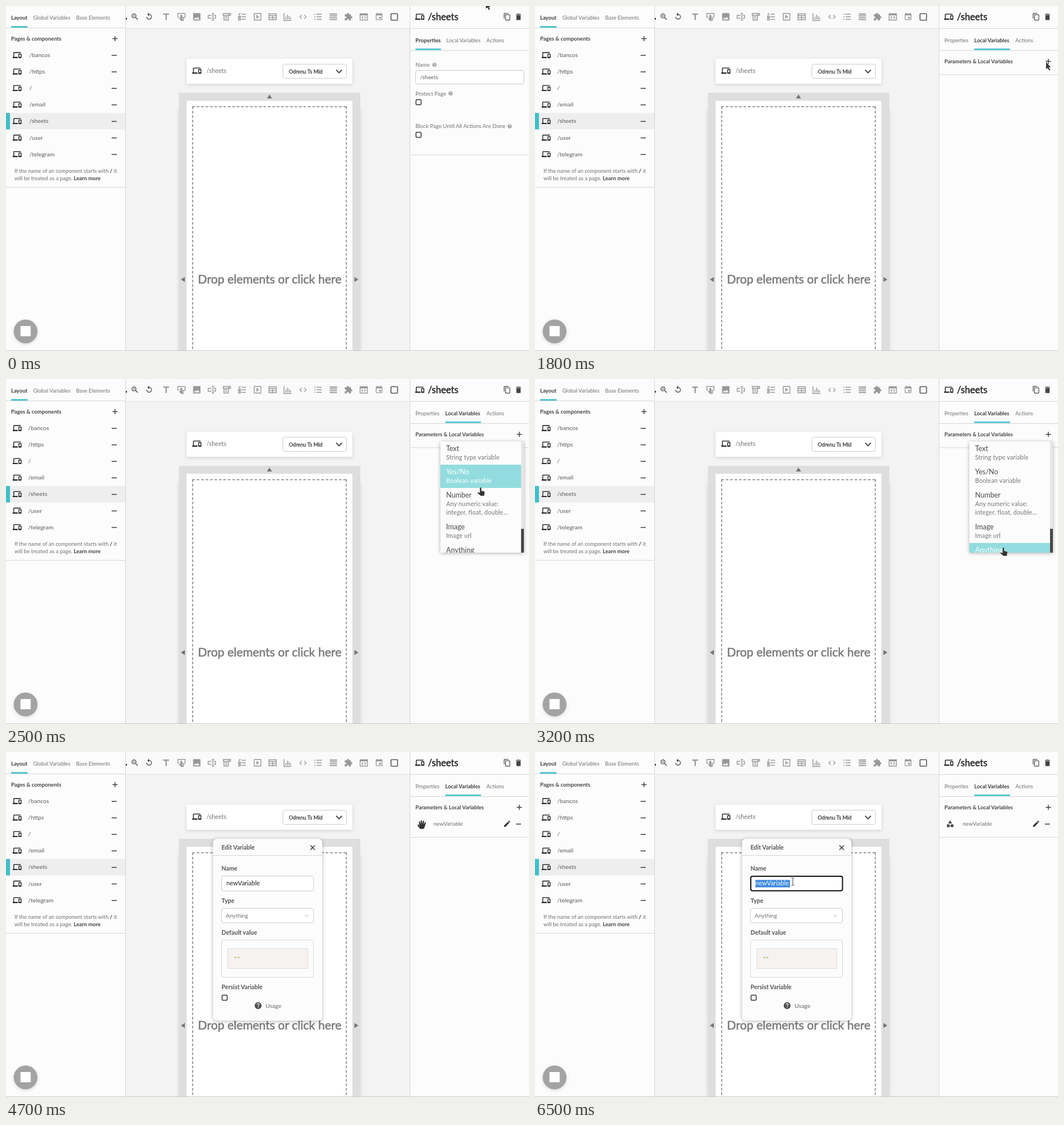
Recreate the animation shown at these times as an HTML page. Size 921x608 px, loop 8 s.

```html
<!DOCTYPE html>
<html lang="en">
<head>
<meta charset="utf-8">
<title>Page editor</title>
<style>
html, body { margin: 0; width: 100%; height: 100%; overflow: hidden; background: #f3f3f3; }
svg { display: block; width: 921px; height: 608px; }
text { font-family: Lato, "Open Sans", sans-serif; white-space: pre; }
.mono { font-family: "Noto Sans Mono", monospace; }
.noto { font-family: "Noto Sans", sans-serif; }
.shade { filter: drop-shadow(0 1px 3px rgba(0,0,0,.3)); }
.soft { filter: drop-shadow(0 2px 3px rgba(0,0,0,.12)); }
</style>
</head>
<body>
<svg id="stage" viewBox="0 0 921 608"></svg>
<script>
const LOOP = 8000, TEAL = '#3dc0cc', GRAY = '#707070', DARK = '#3c3c3c', LINE = '#d6d6d6';

const icons = {
  devices: 'M4 6h18V4H4c-1.1 0-2 .9-2 2v11H0v3h14v-3H4V6zm19 2h-6c-.55 0-1 .45-1 1v10c0 .55.45 1 1 1h6c.55 0 1-.45 1-1V9c0-.55-.45-1-1-1zm-1 9h-4v-7h4v7z',
  zoom: 'M15.5 14h-.79l-.28-.27C15.41 12.59 16 11.11 16 9.5 16 5.91 13.09 3 9.5 3S3 5.91 3 9.5 5.91 16 9.5 16c1.61 0 3.09-.59 4.23-1.57l.27.28v.79l5 4.99L20.49 19l-4.99-5zm-6 0C7.01 14 5 11.99 5 9.5S7.01 5 9.5 5 14 7.01 14 9.5 11.99 14 9.5 14zm2.5-4h-2v2H9v-2H7V9h2V7h1v2h2v1z',
  replay: 'M12 5V1L7 6l5 5V7c3.31 0 6 2.69 6 6s-2.69 6-6 6-6-2.69-6-6H4c0 4.42 3.58 8 8 8s8-3.58 8-8-3.58-8-8-8z',
  title: 'M4 3v3.5h6.3V21h3.4V6.5H20V3z',
  image: 'M22 20V4c0-1.1-.9-2-2-2H4c-1.1 0-2 .9-2 2v16c0 1.1.9 2 2 2h16c1.1 0 2-.9 2-2zM8 13.5l3 3.5 3.5-5 5 7H4z',
  code: 'M9.4 16.6L4.8 12l4.6-4.6L8 6l-6 6 6 6 1.4-1.4zm5.2 0l4.6-4.6-4.6-4.6L16 6l6 6-6 6-1.4-1.4z',
  puzzle: 'M20.5 11H19V7c0-1.1-.9-2-2-2h-4V3.5a2.5 2.5 0 0 0-5 0V5H4c-1.1 0-2 .9-2 2v3.8h1.5a2.7 2.7 0 0 1 0 5.4H2V20c0 1.1.9 2 2 2h3.8v-1.5a2.7 2.7 0 0 1 5.4 0V22H17c1.1 0 2-.9 2-2v-4h1.5a2.5 2.5 0 0 0 0-5z',
  event: 'M17 12h-5v5h5v-5zM16 1v2H8V1H6v2H5c-1.1 0-2 .9-2 2v14c0 1.1.9 2 2 2h14c1.1 0 2-.9 2-2V5c0-1.1-.9-2-2-2h-1V1h-2zm3 18H5V8h14v11z',
  copy: 'M16 1H4c-1.1 0-2 .9-2 2v14h2V3h12V1zm3 4H8c-1.1 0-2 .9-2 2v14c0 1.1.9 2 2 2h11c1.1 0 2-.9 2-2V7c0-1.1-.9-2-2-2zm0 16H8V7h11v14z',
  trash: 'M6 19c0 1.1.9 2 2 2h8c1.1 0 2-.9 2-2V7H6v12zM19 4h-3.5l-1-1h-5l-1 1H5v2h14V4z',
  edit: 'M3 17.25V21h3.75L17.81 9.94l-3.75-3.75L3 17.25zM20.71 7.04c.39-.39.39-1.02 0-1.41l-2.34-2.34c-.39-.39-1.02-.39-1.41 0l-1.83 1.83 3.75 3.75 1.83-1.83z',
  shapes: 'M12 2l-5.5 9h11zM17.5 13a4.5 4.5 0 1 0 .01 0zM3 13.5h8v8H3z',
  help: 'M12 2C6.48 2 2 6.48 2 12s4.48 10 10 10 10-4.48 10-10S17.52 2 12 2zm1 17h-2v-2h2v2zm2.07-7.75l-.9.92C13.45 12.9 13 13.5 13 15h-2v-.5c0-1.1.45-2.1 1.17-2.83l1.24-1.26c.37-.36.59-.86.59-1.41 0-1.1-.9-2-2-2s-2 .9-2 2H8c0-2.21 1.79-4 4-4s4 1.79 4 4c0 .88-.36 1.68-.93 2.25z'
};
const outlines = {
  button: 'M6 13H2V3h20v10h-3M10 17V8.5q1.5-1.5 3 0V13l5 1.5V19l-1.5 3h-5L7 17zM11.5 9v12M14 15v6',
  input: 'M11 8H2v8h9M15 3v18M12 3h6M12 21h6M18 8h4v8h-4',
  form: 'M2 3h20v5H2zM4 8v13h12V8M7 12h6M7 16.5h6M16 5.5h3',
  checks: 'M10 5h12M10 12h12M10 19h12M2 4l2 2 3-4M2 10h5v4H2zM2 17h5v4H2z',
  play: 'M3 3h18v18H3zM10 8.5l5 3.5-5 3.5z',
  table: 'M2 4h20v16H2zM2 9h20M2 14.5h20M12 9v11',
  chart: 'M2 2v20h20M7 19v-7M11.5 19V6M16 19v-9M20 19v-5',
  list: 'M2 5h3M2 12h3M2 19h3M8 5h14M8 12h14M8 19h14',
  rows: 'M2 4.5h20M2 9.5h20M2 14.5h20M2 19.5h20',
  web: 'M2 4h20v17H2zM2 5.5h20M2 7h20M10 11l-3 3 3 3M14 11l3 3-3 3'
};

const rect = (x, y, w, h, fill, more = '') =>
  `<rect x="${x}" y="${y}" width="${w}" height="${h}" fill="${fill}" ${more}/>`;
const box = (x, y, w, h, stroke = '#cbcbcb', fill = '#fff', sw = 1, r = 3) =>
  rect(x, y, w, h, fill, `rx="${r}" stroke="${stroke}" stroke-width="${sw}"`);
const text = (x, y, size, str, fill = GRAY, weight = 400, more = '') =>
  `<text x="${x}" y="${y}" font-size="${size}" fill="${fill}" font-weight="${weight}" ${more}>${str}</text>`;
// Medium weight: regular letters with a hairline outline
const medium = (x, y, size, str, fill) =>
  text(x, y, size, str, fill, 400, `stroke="${fill}" stroke-width="${size * .028}"`);
const path = (d, fill, more = '') => `<path d="${d}" fill="${fill}" ${more}/>`;
const line = (d, color = LINE, w = 1, more = '') => path(d, 'none', `stroke="${color}" stroke-width="${w}" ${more}`);
const place = (cx, cy, size, inner) =>
  `<g transform="translate(${cx - size / 2} ${cy - size / 2}) scale(${size / 24})">${inner}</g>`;
const icon = (name, cx, cy, size, fill) => place(cx, cy, size, path(icons[name], fill));
const outline = (name, cx, cy, size, color, w = 2) => place(cx, cy, size, line(outlines[name], color, w));
const group = (id, inner, more = '') => `<g id="${id}" ${more}>${inner}</g>`;
const plus = (x, y) => line(`M${x - 4.5} ${y}h9M${x} ${y - 4.5}v9`, DARK, 1.4);
const minus = (x, y) => line(`M${x - 4.5} ${y}h9`, DARK, 1.5);
const check = (x, y) => box(x, y, 9, 9, '#333', '#fff', 1.5, 1.5);

function leftPanel() {
  const names = ['/bancos', '/https', '/', '/email', '/sheets', '/user', '/telegram'];
  const rowY = i => 86.5 + i * 29.1;
  let s = rect(0, 0, 210, 608, '#fcfcfc') + line('M210.5 0V608M0 38.5H210M0 319.5H210');
  s += text(9, 24, 9.5, 'Layout', DARK, 700) + text(48, 24, 9.4, 'Global Variables') +
    text(123.5, 24, 9.4, 'Base Elements') + rect(9, 35.5, 29, 2.5, TEAL);
  s += text(9, 61, 9.5, 'Pages &amp; components', '#444', 700) + plus(192, 57.5);
  s += rect(0, 188.5, 210, 29, '#eee') + rect(0, 188.5, 7, 29, TEAL);
  names.forEach((n, i) => s += icon('devices', 19.5, rowY(i), 15.5, '#111') + minus(190.5, rowY(i) + .5));
  s += group('names', names.map((n, i) => text(0, rowY(i) + 3.5, 10.4, n, '#585858')).join(''));
  s += text(15, 294, 9.45, 'If the name of an component starts with <tspan font-weight="700" fill="#333">/</tspan> it') +
    text(15, 306.5, 9.45, 'will be treated as a page. <tspan font-weight="700" fill="#444">Learn more</tspan>');
  return s;
}

function toolbar() {
  const ink = '#979797';
  let s = rect(211, 0, 500, 39, '#fafafa') + line('M211 39.5H711', '#e0e0e0') + rect(211, 21, 2, 3, '#333');
  s += icon('zoom', 227, 19, 15.5, '#444') + icon('replay', 252, 18.5, 14.5, '#444');
  [['title', 282], ['image', 336], ['code', 523], ['puzzle', 603], ['event', 657]]
    .forEach(([n, x]) => s += icon(n, x, 19, 15.5, ink));
  [['button', 309], ['input', 362.5], ['form', 389], ['checks', 416], ['play', 443], ['table', 469.5],
   ['chart', 496], ['list', 549.5], ['rows', 576.5], ['web', 630]]
    .forEach(([n, x]) => s += outline(n, x, 19, 15.5, ink, n === 'rows' ? 3 : 2.2));
  return s + box(678, 13.5, 11.5, 11.5, '#555', 'none', 1.6, 1);
}

function canvas() {
  return rect(318, 93, 292, 44, '#fff', 'class="soft"') + icon('devices', 336, 114, 16, '#111') +
    text(353, 118, 10.8, '/sheets') + box(487.5, 102.5, 112, 25) +
    medium(498, 119, 9.2, 'Odrenu Ts Mid', '#333') +
    line('M581.5 112.5l5 5.2 5-5.2', '#555', 2.2) +
    rect(304.5, 180, 319.5, 440, '#dedede', 'class="soft"') + rect(304.5, 153, 319.5, 455, '#dedede') +
    rect(318, 167, 292, 441, '#fff') +
    line('M328 177.5H600M328.7 177V608M599.3 177V608', '#7d7d7d', 1.5, 'stroke-dasharray="4.7 3.13"') +
    path('M464 156l4.5 7h-9zM308 482l7-4.5v9zM620.5 482l-7-4.5v9z', '#757575') +
    medium(338, 489, 21, 'Drop elements or click here', '#7b7b7b');
}

function rightPanel() {
  const tabs = (p, l, hover) => text(721, 63.5, p ? 9.6 : 9.35, 'Properties', p ? DARK : GRAY, p ? 700 : 400) +
    group(hover, text(l ? 773.5 : 775.5, 63.5, 9.4, 'Local Variables', l ? DARK : GRAY, l ? 700 : 400)) +
    text(846, 63.5, 9.4, 'Actions') + (p ? rect(721, 75, 45, 2.5, TEAL) : rect(773.5, 75, 63, 2.5, TEAL));
  const help = (x, y) => icon('help', x, y, 9, '#a5a5a5');
  return rect(711, 0, 210, 608, '#fcfcfc') + line('M711.5 0V608M711 39.5H921M711 78.5H921') +
    icon('devices', 728.5, 19, 16, '#111') + medium(743, 25, 16.5, '/sheets', '#222') +
    icon('copy', 882.5, 19, 14, '#444') + icon('trash', 902.5, 19, 15, '#444') +
    group('props', tabs(true, false, 'tabHover') +
      text(721, 107, 9.7, 'Name') + help(754.5, 103.5) + box(721.5, 113.5, 190.5, 24) +
      text(729, 128.5, 9.9, '/sheets', '#616161') +
      text(721, 157.5, 9.7, 'Protect Page') + help(783, 154) + check(722, 165) +
      text(721, 215, 9.6, 'Block Page Until All Actions Are Done') + help(887, 212) + check(722, 222.5) +
      line('M711 262.5H921')) +
    group('locals', tabs(false, true, 'tabOn') +
      text(721, 100.5, 9.4, 'Parameters &amp; Local Variables', '#444', 700) + plus(904, 97.5)) +
    group('emptyEnd', line('M711 121H921')) +
    group('row', icon('shapes', 731, 126.5, 15, '#4a4a4a') + text(753, 130, 9.65, 'newVariable') +
      icon('edit', 882.5, 126.5, 14.5, '#333') + minus(902.5, 127) + line('M711 150.5H921'));
}

function menu() {
  const sub = (y, str) => text(775, y, 10.8, str, '#757575', 400, 'letter-spacing=".15"');
  const item = (id, y, h, name, subs) => rect(765, y, 142, h, '#92dcdf', `id="${id}Bg"`) +
    group(id, text(775, y + 17.3, 12.5, name, '#4a4a4a') + subs.map((t, i) => sub(y + 32 + i * 15, t)).join(''));
  return group('menu', rect(765, 110, 147, 196, '#fcfcfc', 'class="shade"') +
    `<clipPath id="clip"><rect x="765" y="110" width="147" height="196"/></clipPath><g clip-path="url(#clip)">` +
    item('mText', 110, 41, 'Text', ['String type variable']) +
    item('mBool', 151, 41, 'Yes/No', ['Boolean variable']) +
    item('mNumber', 192, 56, 'Number', ['Any numeric value:', 'integer, float, double...']) +
    item('mImage', 248, 41, 'Image', ['Image url']) +
    item('mAny', 289, 41, 'Anything', []) +
    rect(907, 110, 5, 154, '#e6e6e6') + rect(907, 264, 5, 42, '#484848') + '</g>');
}

function modal() {
  const label = (y, str) => text(379.5, y, 10.6, str, '#555', 700);
  return group('modal', rect(364.5, 153, 192.5, 320.5, '#fcfcfc', 'rx="7" class="shade"') +
    line('M365 182.5H557') + text(379.5, 172, 10.5, 'Edit Variable', '#555', 700) +
    line('M536 164.5l8 8m0-8l-8 8', '#333', 1.4) +
    label(209, 'Name') + box(379.5, 218.5, 162, 26.5) +
    group('nameFocus', box(380, 219, 161.5, 25.5, '#111', 'none', 2)) +
    rect(388, 225.5, 61, 13, '#3f8ae0', 'id="mark"') +
    text(388, 235.3, 11, 'newVariable', '#222', 400, 'id="value"') +
    label(266, 'Type') + box(379.5, 275.5, 162, 25.5) +
    group('typeFocus', box(379.5, 275.5, 162, 25.5, '#777', 'none')) +
    text(387, 291.5, 9.9, 'Anything') + line('M526 287l3 3 3-3', '#b5b5b5') +
    label(321.5, 'Default value') + box(379.5, 331.5, 162, 65.5, '#d5d5d5', '#fcfcfc') +
    rect(390.5, 346.5, 141, 35, '#f5f2f0', 'stroke="#dcdcdc"') +
    text(401, 367.5, 9.3, '""', '#669900', 400, 'class="mono"') +
    label(418, 'Persist Variable') + check(380.5, 428.5) +
    icon('help', 444, 447, 14.5, '#505050') + text(457, 451, 10.4, 'Usage', '#666'));
}

function cursors() {
  const edge = 'stroke="#fff" stroke-width=".8" stroke-linejoin="round" paint-order="stroke"';
  const ink = '#333';
  return group('pointer',
    group('arrow', path('M0 0L8 9.5 5 9.7 7.3 14.3 5.2 15 3 10.5 0 12.8z', ink, edge)) +
    group('hand', path('M-1.5 1.3a1.3 1.3 0 0 1 2.6 0V6l4.5 1q1.300.3 1.200 1.800l-.8 6h-6.200L-5.700 9.500q.6-1.600 4.200.6z', ink, edge)) +
    group('grab', path('M-3.5 15.5L-7.5 9q-.2-1.6 1.6-1L-4 10-5.5 3.2q.5-1.5 2 0L-2 7.5-2 1q1-1.6 2 0L.5 7 2 1.2q1.4-1.2 2 .4L3 7.5 5.5 3.8q1.5-.8 1.5.8L5 11.5 3 15.5z', ink, edge)) +
    group('beam', line('M-2.5-6.5h2l.5.5.5-.5h2M-2.5 6.5h2l.5-.5.5.5h2M0-6V6', '#444', 1)) +
    group('resize', line('M-1.5-6.5v13M1.5-6.5v13M-7 0h5M7 0h-5', ink, 1.3) + path('M-8.5 0l3.5-3v6zM8.5 0l-3.5-3v6z', ink)));
}

document.getElementById('stage').innerHTML =
  rect(0, 0, 921, 608, '#f3f3f3') + canvas() + toolbar() + leftPanel() + rightPanel() + menu() + modal() +
  rect(0, 607, 921, 1, '#c9c9c9') +
  '<circle cx="34.5" cy="573.5" r="21" fill="#a3a3a3" class="soft"/>' + rect(25.5, 564, 18, 18, '#fff') +
  group('status', rect(0, 593, 305.5, 15, '#0b0b0b') +
    text(2.5, 603.8, 8.8, 'create.abstra.app/project/.../4e9c166d-41ef-460e-9e6e-7cee483b99f0', '#f0f0f0', 400, 'class="noto"')) +
  group('edgeHover', rect(710.5, 0, 2, 608, '#aaa')) + cursors();

const el = {};
document.querySelectorAll('[id]').forEach(e => el[e.id] = e);

// [time, cursor, x, y]
const moves = [
  [0, 'arrow', 845, -8], [300, 'hand', 830, 52], [500, 'hand', 831, 55], [600, 'hand', 832, 57],
  [900, 'hand', 830, 58], [1000, 'hand', 814, 62], [1100, 'arrow', 794, 77], [1200, 'arrow', 782, 82],
  [1300, 'arrow', 788, 86], [1400, 'arrow', 806, 92], [1500, 'arrow', 834, 97], [1600, 'arrow', 866, 99],
  [1700, 'arrow', 892, 100], [1800, 'arrow', 900, 98.5], [2000, 'arrow', 899, 101],
  [2100, 'hand', 893, 117], [2200, 'hand', 879, 135], [2300, 'hand', 861, 158], [2400, 'hand', 845, 180],
  [2500, 'hand', 836, 191], [3200, 'hand', 825, 297], [3900, 'hand', 823.5, 295],
  [4200, 'arrow', 790, 272], [4300, 'arrow', 750, 224], [4500, 'arrow', 770, 137], [4700, 'grab', 732.5, 120],
  [4900, 'resize', 711.5, 150], [5200, 'arrow', 528, 236], [5500, 'beam', 470, 233],
  [5700, 'hand', 446, 277], [5900, 'hand', 450, 254], [6100, 'beam', 454, 235], [6300, 'beam', 454, 228.5]
];
// Visible spans, in ms
const spans = {
  props: [0, 900], locals: [900, LOOP], emptyEnd: [900, 3900], row: [3900, LOOP],
  status: [900, 1600], menu: [2000, 4300], modal: [3900, LOOP],
  mTextBg: [2100, 2300], mBoolBg: [2300, 3200], mNumberBg: [0, 0], mImageBg: [0, 0], mAnyBg: [3200, LOOP],
  nameFocus: [5500, 5700, 6300, LOOP], typeFocus: [5900, 6100], mark: [6500, LOOP], edgeHover: [5000, 5200]
};
const on = (s, t) => (t >= s[0] && t < s[1]) || (s.length > 2 && t >= s[2] && t < s[3]);
const tint = (node, first, rest) => [...node.children].forEach((c, i) => c.setAttribute('fill', i ? rest : first));

function draw(t) {
  for (const id in spans) el[id].style.display = on(spans[id], t) ? '' : 'none';
  const [, kind, x, y] = moves.filter(m => m[0] <= t).pop();
  el.pointer.setAttribute('transform', `translate(${x} ${y})`);
  ['arrow', 'hand', 'grab', 'beam', 'resize'].forEach(k => el[k].style.display = k === kind ? '' : 'none');
  el.names.setAttribute('transform', `translate(${t < 900 ? 41 : t < 1700 ? 40 : 39} 0)`);
  tint(el.tabHover, t < 300 ? GRAY : DARK);
  ['mText', 'mBool', 'mAny'].forEach(id =>
    on(spans[id + 'Bg'], t) ? tint(el[id], '#fff', '#fff') : tint(el[id], '#4a4a4a', '#757575'));
  el.mAnyBg.setAttribute('fill', t < 3900 ? '#92dcdf' : TEAL);
  el.menu.setAttribute('opacity', t < 4200 ? 1 : .5);
  el.value.setAttribute('fill', t < 6500 ? '#222' : '#fff');
}

const start = performance.now();
(function tick() {
  draw((performance.now() - start) % LOOP);
  requestAnimationFrame(tick);
})();
</script>
</body>
</html>
```
